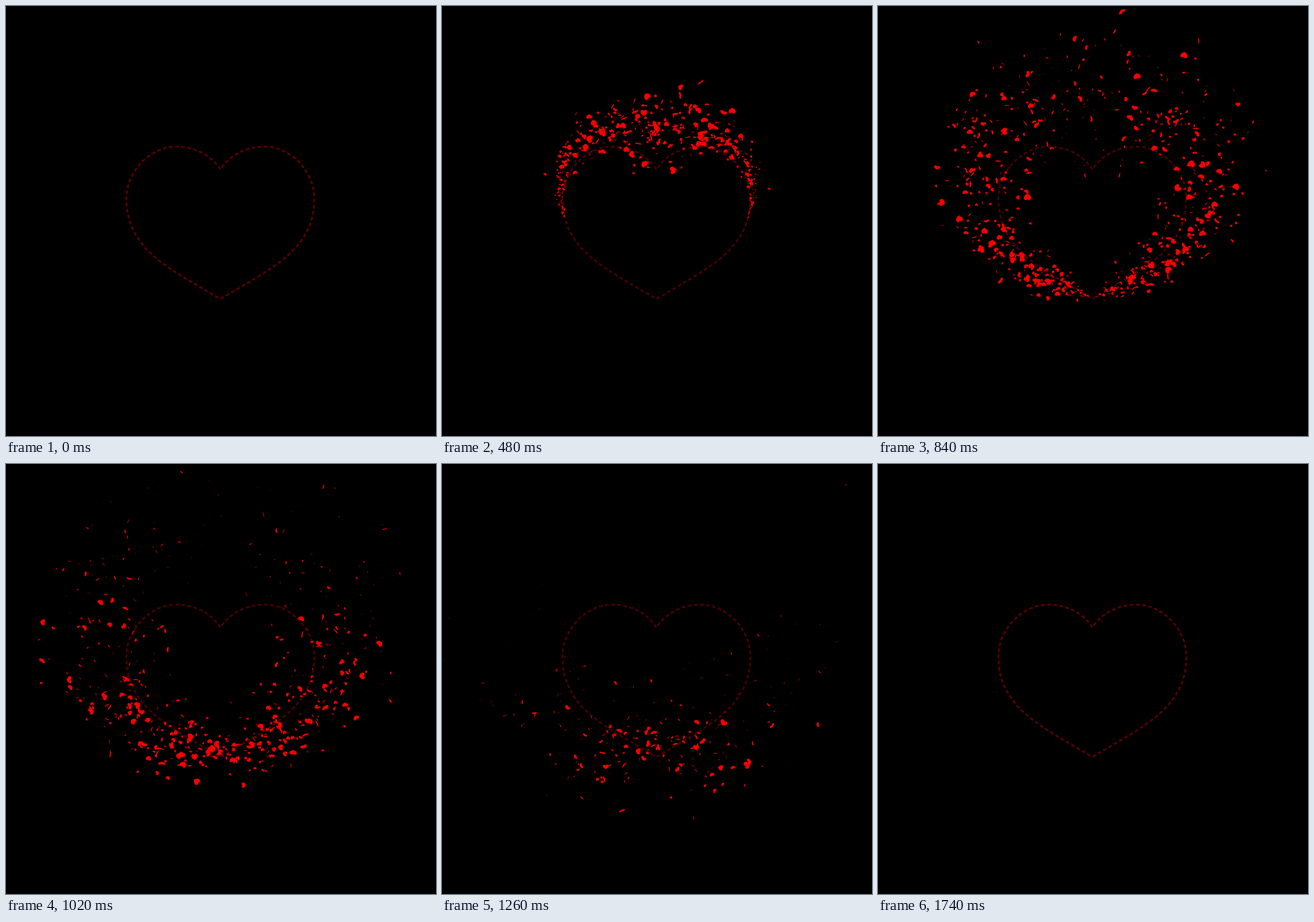
Write an HTML page with a canvas that moves like this. It is 700 by 700 pixels and loops after 1.77 s.

```html
<!DOCTYPE html>
<html>
<head>
<meta charset="utf-8">
<style>
html, body { margin: 0; width: 100%; height: 100%; overflow: hidden; background: #000; }
canvas { display: block; }
</style>
</head>
<body>
<canvas id="stage" width="700" height="700"></canvas>
<script>
const ctx = document.getElementById('stage').getContext('2d');
const LOOP = 1770, STEP = 30, SPREAD = 910, AXIS = 349;

// Left half of the heart, from the notch down to the tip
const curves = [
  [349, 266, 334, 243, 308, 229, 277, 229],
  [277, 229, 234, 229, 196, 270, 196, 313],
  [196, 313, 196, 398, 268, 428, 349, 477]
];

let seed = 20417;
function rnd() {
  seed = (seed * 1664525 + 1013904223) >>> 0;
  return seed / 4294967296;
}
const gauss = () => (rnd() + rnd() + rnd() + rnd() - 2) * 1.73;

function bez(a, b, c, d, u) {
  const v = 1 - u;
  return v * v * v * a + 3 * v * v * u * b + 3 * v * u * u * c + u * u * u * d;
}

const line = [];
let total = 0;
for (const c of curves) {
  for (let i = 0; i < 60; i++) {
    const u = i / 59;
    const x = bez(c[0], c[2], c[4], c[6], u);
    const y = bez(c[1], c[3], c[5], c[7], u);
    const last = line[line.length - 1];
    const d = last ? Math.hypot(x - last.x, y - last.y) : 0;
    if (last && d < 0.01) continue;
    total += d;
    line.push({ x, y, s: total });
  }
}

// Position and outward normal at a share of the half outline
function along(f) {
  const s = f * total;
  let i = 1;
  while (i < line.length - 1 && line[i].s < s) i++;
  const a = line[i - 1], b = line[i], len = b.s - a.s;
  const k = (s - a.s) / len;
  return {
    x: a.x + (b.x - a.x) * k, y: a.y + (b.y - a.y) * k,
    nx: (b.y - a.y) / len * -1, ny: (b.x - a.x) / len
  };
}

function look() {
  return {
    size: 1.9 + 3.6 * Math.pow(rnd(), 3),
    turn: rnd() * Math.PI * 2, spin: (rnd() - 0.5) * 0.008,
    flip: rnd() * Math.PI, roll: 0.002 + rnd() * 0.005
  };
}

const petals = [];
for (let i = 0; i < 780; i++) {
  const f = (i + rnd()) / 780;
  const p = along(f);
  const side = i % 2 ? -1 : 1;
  const born = SPREAD * Math.acos(1 - 2 * f) / Math.PI;
  const out = 0.088 + 0.095 * gauss(), slip = 0.05 * gauss();
  const vx = (p.nx * out - p.ny * slip) * side;
  const vy = p.ny * out + p.nx * slip - 0.065;
  petals.push(Object.assign(look(), {
    x: side > 0 ? p.x : 2 * AXIS - p.x, y: p.y, vx, vy, born,
    life: Math.min(540 + 340 * rnd(), 1745 - born), drag: 0.00015
  }));
}

// Fast stray petals: place at 840 ms, speed, birth, size
[
  [397, 9, -0.067, -0.32, 230, 5.5],
  [320, 53, -0.19, -0.22, 250, 4.5],
  [244, 111, -0.25, -0.1, 260, 5],
  [586, 160, 0.17, -0.3, 450, 3.5],
  [583, 294, 0.14, -0.01, 440, 5],
  [104, 320, -0.25, 0, 480, 5],
  [96, 263, -0.2, -0.03, 430, 4.5]
].forEach(([x, y, vx, vy, born, size]) => {
  const back = 840 - born;
  petals.push(Object.assign(look(), {
    x: x - vx * back, y: y - vy * back, vx, vy, born, size, life: 850, drag: 0
  }));
});

function outline(t) {
  ctx.strokeStyle = t < STEP || t > 1640 ? '#580000' : '#480000';
  ctx.lineWidth = 3;
  ctx.setLineDash([6, 4]);
  ctx.beginPath();
  ctx.moveTo(AXIS, 266);
  for (const c of curves) ctx.bezierCurveTo(...c.slice(2));
  for (const c of curves.slice().reverse()) {
    const m = i => 2 * AXIS - c[i];
    ctx.bezierCurveTo(m(4), c[5], m(2), c[3], m(0), c[1]);
  }
  ctx.stroke();
}

function petal(p, t) {
  const age = t - p.born;
  if (age <= 0 || age >= p.life) return;
  const left = 1 - age / p.life;
  const grow = Math.min(1, 0.3 + age / 230);
  const r = p.size * grow * Math.min(1, 0.35 + left * 2.6);
  const way = age * (1 - p.drag * age);
  const flat = Math.max(0.22, Math.abs(Math.cos(p.flip + p.roll * age))) * Math.min(1, 0.12 + left * 2.4);
  // Old petals settle towards level
  const level = Math.max(0, 1 - left * 3);
  const turn = Math.sin(p.turn + p.spin * age) * Math.PI * (1 - 0.85 * level);
  ctx.save();
  ctx.translate(p.x + p.vx * way, p.y + p.vy * way);
  ctx.rotate(turn);
  ctx.scale(r, r * flat);
  ctx.beginPath();
  ctx.moveTo(0, -0.6);
  ctx.bezierCurveTo(0.4, -1.25, 1.2, -0.9, 1.1, -0.1);
  ctx.bezierCurveTo(1, 0.5, 0.5, 0.8, 0, 1.1);
  ctx.bezierCurveTo(-0.5, 0.8, -1, 0.5, -1.1, -0.1);
  ctx.bezierCurveTo(-1.2, -0.9, -0.4, -1.25, 0, -0.6);
  ctx.fill();
  ctx.restore();
}

function draw(t) {
  ctx.fillStyle = '#000';
  ctx.fillRect(0, 0, 700, 700);
  outline(t);
  ctx.fillStyle = '#f00';
  if (t >= STEP) for (const p of petals) petal(p, t);
}

const start = performance.now();
function tick() {
  const t = (performance.now() - start) % LOOP;
  draw(Math.floor(t / STEP) * STEP);
  requestAnimationFrame(tick);
}
tick();
</script>
</body>
</html>
```
